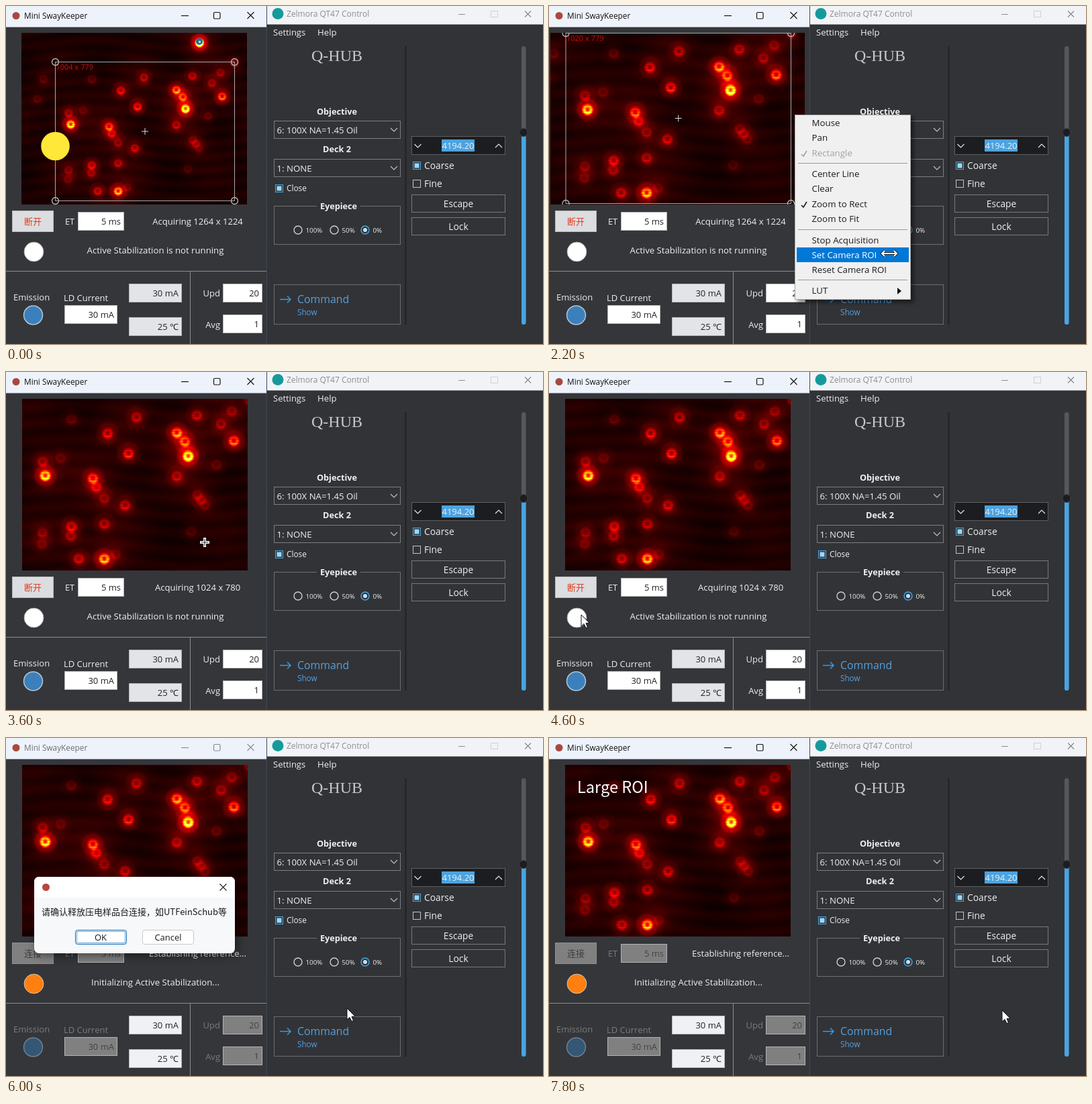
These frames come from a looping animation (800x504 px, 8000 ms). An HTML page with a canvas:

```html
<!DOCTYPE html>
<html lang="en">
<head>
<meta charset="utf-8">
<style>
  html, body { margin: 0; width: 100%; height: 100%; overflow: hidden; background: #35363a; }
  canvas { display: block; width: 800px; height: 504px; }
</style>
</head>
<body>
<canvas id="stage" width="800" height="504"></canvas>
<script>
const ctx = document.getElementById('stage').getContext('2d');
const LATIN = '"Open Sans", "Noto Sans", sans-serif';
const HAN = '"Noto Sans CJK SC", "Noto Sans CJK JP", "Noto Sans CJK", sans-serif';
const LOOP = 8000, STEP = 200;

// ---------- drawing helpers ----------
function text(str, x, yMid, { size = 13, color = '#f0f0f0', align = 'left', weight = 400, font = LATIN } = {}) {
  ctx.font = `${weight} ${size}px ${font}`;
  ctx.fillStyle = color;
  ctx.textAlign = align;
  ctx.fillText(str, x, yMid + size * 0.36);
}
function fill(x, y, w, h, color) {
  ctx.fillStyle = color;
  ctx.fillRect(x, y, w, h);
}
function frame(x, y, w, h, color, background) {
  if (background) fill(x, y, w, h, background);
  ctx.lineWidth = 1;
  ctx.strokeStyle = color;
  ctx.strokeRect(x + 0.5, y + 0.5, w - 1, h - 1);
}
function disc(x, y, r, color, border, width = 1) {
  ctx.beginPath();
  ctx.arc(x, y, r, 0, 7);
  if (color) { ctx.fillStyle = color; ctx.fill(); }
  if (border) { ctx.lineWidth = width; ctx.strokeStyle = border; ctx.stroke(); }
}
function lines(color, width, ...paths) {
  ctx.beginPath();
  for (const p of paths)
    for (let i = 0; i < p.length; i += 2) i ? ctx.lineTo(p[i], p[i + 1]) : ctx.moveTo(p[i], p[i + 1]);
  ctx.strokeStyle = color;
  ctx.lineWidth = width;
  ctx.stroke();
}
function panel(x, y, w, h, r, color, border) {
  ctx.beginPath();
  ctx.roundRect(x, y, w, h, r);
  ctx.fillStyle = color;
  ctx.fill();
  if (border) { ctx.strokeStyle = border; ctx.lineWidth = 1; ctx.stroke(); }
}
function withShadow(blur, offset, draw) {
  ctx.save();
  ctx.shadowColor = 'rgba(0,0,0,.5)';
  ctx.shadowBlur = blur;
  ctx.shadowOffsetX = ctx.shadowOffsetY = offset;
  draw();
  ctx.restore();
}
const cross = (x, y, r, color = '#ddd', width = 1) =>
  lines(color, width, [x - r, y, x + r, y], [x, y - r, x, y + r]);
const closeMark = (x, y, r, color) =>
  lines(color, 1.1, [x - r, y - r, x + r, y + r], [x - r, y + r, x + r, y - r]);

// ---------- fluorescence picture: x, y, peak ----------
const SPOTS = [
  [57, 154, .8], [53, 133, .22], [80, 128, .11], [128, 158, .46], [133, 171, .28], [145, 188, .2],
  [150, 91, .36], [181, 121, .42], [193, 67, .28], [253, 90, .54], [265, 103, .46], [270, 125, .9],
  [253, 155, .26], [283, 64, .26], [319, 77, .22], [335, 58, .18], [338, 102, .54], [312, 138, .12],
  [284, 183, .15], [289, 190, .15], [295, 198, .12], [176, 198, .3], [145, 226, .26], [96, 230, .32],
  [95, 244, .2], [53, 239, .18], [52, 256, .14], [145, 278, .68], [107, 278, .3], [162, 271, .12],
  [96, 70, .12], [361, 41, .16], [296, 2, 1.1], [6, 70, .12], [-5, 107, .1], [274, 237, .09]
];
function intensity(x, y) {
  let v = 0.036 + 0.009 * Math.sin(y / 4 + 2 * Math.sin(x / 60)) + 0.012 * Math.sin(x / 23) * Math.sin(y / 31);
  for (const [sx, sy, peak] of SPOTS) {
    const dx = x - sx, dy = y - sy, r = Math.hypot(dx, dy);
    if (r > 70) continue;
    const ring = 0.6 * Math.exp(-(((r - 5.3) / 3) ** 2)) * (0.75 + 0.25 * dy / (r + 1)) * (1 + 0.15 * Math.cos(1.5 * dy));
    const blob = 0.28 * Math.exp(-r * r / 110);
    const fringe = 0.07 * Math.exp(-(((r - 14) / 3) ** 2));
    v += peak * (ring + blob + fringe + 0.06 * Math.exp(-r * r / 900));
  }
  return v;
}
function renderPicture(w, h, mapX, mapY) {
  const canvas = document.createElement('canvas');
  canvas.width = w;
  canvas.height = h;
  const c = canvas.getContext('2d'), image = c.createImageData(w, h);
  for (let y = 0, i = 0; y < h; y++)
    for (let x = 0; x < w; x++) {
      const v = 3 * intensity(mapX(x), mapY(y));
      for (let k = 0; k < 3; k++) image.data[i++] = 255 * (v - k);
      image.data[i++] = 255;
    }
  c.putImageData(image, 0, 0);
  return canvas;
}
const ZOOM = 1.246;
const zoomedPicture = renderPicture(379, 256, x => x + 2, y => y + 40);
const fittedPicture = renderPicture(336, 256,
  x => 57 + ZOOM * (x + 23 - 96), y => 154 + ZOOM * (y + 40 - 176));

function selection(x1, y1, x2, y2, label) {
  ctx.lineWidth = 1;
  ctx.strokeStyle = '#aaa';
  ctx.strokeRect(x1, y1, x2 - x1, y2 - y1);
  text(label, x1 + 1, y1 + 7.5, { size: 11, color: '#c01010' });
  for (const x of [x1, x2]) for (const y of [y1, y2]) disc(x, y, 5, null, '#bbb', 1.3);
  cross((x1 + x2) / 2, (y1 + y2) / 2, 5);
}
function picture(t) {
  ctx.save();
  ctx.beginPath();
  ctx.rect(2, 40, 379, 256);
  ctx.clip();
  if (t < 1200) {
    ctx.drawImage(fittedPicture, 23, 40);
    disc(288, 53, 5, '#2668a8');
    fill(287, 52, 3, 3, '#e8e070');
    ctx.restore();
    const dragged = t >= 200;
    selection(dragged ? 70.5 : 73.5, 83.5, 340.5, 290.5, dragged ? '1020 x 779' : '1004 x 779');
    return;
  }
  if (t < 2400) {
    ctx.drawImage(zoomedPicture, 2, 40);
    selection(25, 40.5, 360.5, 294.5, '1020 x 779');
  } else {
    ctx.drawImage(zoomedPicture, 21, 0, 336, 256, 24, 40, 336, 256);
  }
  ctx.restore();
}

// ---------- left window ----------
function field(x, y, w, value, background, color = '#222') {
  frame(x, y, w, 28, '#b4b4b4', background);
  text(value, x + w - 5, y + 14, { color, align: 'right' });
}
function leftWindow(t) {
  const busy = t >= 5000, modal = t >= 4800 && t < 7000;
  fill(0, 0, 388, 504, '#35363a');
  fill(0, 0, 388, 31.5, '#eef3fb');
  const ink = modal ? '#8b8d91' : '#111';
  disc(15, 14.5, 5.5, '#a8493f');
  text('Mini SwayKeeper', 27, 14.5, { size: 11.8, color: modal ? '#6e7074' : '#111' });
  lines(ink, 1.2, [261, 14.5, 272, 14.5]);
  ctx.strokeStyle = ink;
  ctx.beginPath();
  ctx.roundRect(309.5, 9.5, 9.5, 9.5, 1.5);
  ctx.stroke();
  closeMark(364.5, 14, 5, ink);

  picture(t);

  const label = busy ? '#7b7c7e' : '#eeeeee';
  const dim = '#808080', value = busy ? '#424242' : '#222';
  const editable = busy ? dim : '#fff', readout = busy ? '#f0f1f4' : '#e2e4e8';
  frame(9, 305, 62, 32, busy ? '#909090' : '#b8b8b8', busy ? dim : '#dcdde0');
  text(busy ? '连接' : '断开', 40, 321, { weight: 500, color: busy ? '#3d3d3d' : '#e03a1c', align: 'center', font: HAN });
  text('ET', 88, 321.5, { color: label, size: 12.7 });
  field(107, 307, 69, '5 ms', editable, value);
  const status = busy ? 'Establishing reference...' : `Acquiring ${t < 2400 ? '1264 x 1224' : '1024 x 780'}`;
  text(status, 285.5, 321, { size: 13.1, align: 'center' });
  disc(41.5, 366.5, 14.4, busy ? '#ff8010' : '#fff', busy ? '#d8c8b8' : '#b4b4b4');
  text(busy ? 'Initializing Active Stabilization...' : 'Active Stabilization is not running', 222.5, 364.5,
    { size: 13.2, align: 'center' });

  lines('#8c8d90', 1, [0, 395.5, 388, 395.5], [274.5, 396, 274.5, 504]);
  text('Emission', 11, 434, { color: label });
  disc(40.5, 461, 14, busy ? '#345775' : '#3b80bd', busy ? '#6e7f8e' : '#b4c4d2', 1.5);
  text('LD Current', 86, 435, { color: label });
  field(87, 446, 79, '30 mA', editable, value);
  field(183, 414, 79, '30 mA', readout);
  field(183, 464, 79, '25 ℃', readout);
  text('Upd', 319, 428.5, { color: label, align: 'right' });
  field(323, 414, 59, '20', editable, value);
  text('Avg', 319, 475.5, { color: label, align: 'right' });
  field(323, 460, 59, '1', editable, value);
}

// ---------- right window ----------
function chevron(x, y, dir, color = '#e6e6e6') {
  lines(color, 1.2, [x - 5, y - 2.5 * dir, x, y + 2.5 * dir, x + 5, y - 2.5 * dir]);
}
function combo(y, value) {
  frame(399, y, 189, 27, '#7b7d81');
  text(value, 403.5, y + 14, { size: 13.2 });
  chevron(578, y + 13.5, 1, '#c0c0c0');
}
function checkbox(x, y, on) {
  frame(x, y, 12, 12, on ? '#4aa8e0' : '#c4c4c4');
  if (on) fill(x + 2.5, y + 2.5, 7, 7, '#9bd8fa');
}
function radio(x, caption, on) {
  disc(x, 334, 6, null, on ? '#48a8e2' : '#d0d0d0', 1.4);
  if (on) disc(x, 334, 3, '#b8e4ff');
  text(caption, x + 11.5, 334, { size: 9.8 });
}
function rightWindow() {
  const heading = { size: 12.7, weight: 700, align: 'center' };
  fill(388, 0, 1, 504, '#3a4a5c');
  fill(389, 0, 411, 504, '#323337');
  fill(389, 0, 411, 27.5, '#f1f3f6');
  disc(405, 11.5, 8.5, '#159a9c');
  text('Zelmora QT47 Control', 418, 12, { size: 12, color: '#8c8e91' });
  lines('#8c8e91', 1, [674, 12.5, 684, 12.5]);
  frame(722, 7, 11, 10, '#cfd1d4');
  closeMark(777.5, 12, 4.5, '#858789');
  text('Settings', 398, 39.5);
  text('Help', 464, 39.5, { size: 13.2 });
  text('Q-HUB', 493, 73, { size: 24, color: '#c8c8c8', align: 'center', font: '"Liberation Serif", serif' });

  text('Objective', 493, 157, heading);
  combo(171, '6: 100X NA=1.45 Oil');
  text('Deck 2', 493, 213.5, heading);
  combo(228, '1: NONE');
  checkbox(401, 266, true);
  text('Close', 418, 272, { size: 11.8 });
  frame(399, 298, 189, 58, '#6e7074');
  fill(463, 296, 65, 5, '#323337');
  text('Eyepiece', 495.5, 298, heading);
  radio(435, '100%');
  radio(489, '50%');
  radio(535, '0%', true);
  frame(399, 415, 189, 60, '#6a6c70');
  lines('#3f97da', 1.5, [408, 437.5, 424, 437.5], [419, 432.5, 424, 437.5, 419, 442.5]);
  text('Command', 434, 437.5, { size: 15.8, color: '#56a0dc' });
  text('Show', 434, 457, { size: 11.7, color: '#56a0dc' });

  lines('#212226', 2, [595.5, 60, 595.5, 475]);
  frame(604, 194, 140, 28, '#5d5f63', '#1b1d21');
  fill(649, 199, 49, 18, '#4ba3e0');
  text('4194.20', 673.5, 208.5, { align: 'center' });
  chevron(613.5, 208.5, 1);
  chevron(734, 208.5, -1);
  checkbox(606, 232, true);
  text('Coarse', 623, 238, { size: 13.8 });
  checkbox(606, 259, false);
  text('Fine', 623, 265, { size: 13.8 });
  frame(604, 281, 140, 27, '#77797d');
  text('Escape', 674, 295, { size: 13.7, align: 'center' });
  frame(604, 315, 140, 27, '#77797d');
  text('Lock', 674, 328.5, { size: 13.9, align: 'center' });

  panel(768, 60, 6.5, 415, 3, '#57585c');
  panel(768, 189, 6.5, 286, 3, '#46a6e2');
  disc(771, 188.5, 6, '#1b1d21', '#3c3e42');
}

// ---------- pop-ups ----------
const MENU = [
  ['Mouse', 12], ['Pan', 34.5], ['Rectangle', 57], ['Center Line', 88.5], ['Clear', 110.5],
  ['Zoom to Rect', 133], ['Zoom to Fit', 155], ['Stop Acquisition', 187], ['Set Camera ROI', 209],
  ['Reset Camera ROI', 231], ['LUT', 262.5]
];
function menu(x, y, checked, active) {
  withShadow(6, 4, () => fill(x, y, 173, 276, '#f0f0f0'));
  frame(x, y, 173, 276, '#a8a8a8');
  for (const s of [72.5, 171.5, 246.5]) lines('#9a9a9a', 1, [x + 5, y + s, x + 168, y + s]);
  for (const [name, dy] of MENU) {
    const off = name === 'Rectangle', on = name === active;
    const color = off ? '#a2a2a2' : on ? '#fff' : '#1c1c1c';
    if (on) fill(x + 3, y + dy - 11, 167, 22, '#0078d7');
    text(name, x + 25.5, y + dy, { size: 13.3, color });
    if (off || name === checked)
      lines(color, 1.6, [x + 10, y + dy + 2, x + 13, y + dy + 5, x + 18, y + dy - 3]);
  }
  ctx.fillStyle = '#111';
  ctx.beginPath();
  ctx.moveTo(x + 153, y + 258);
  ctx.lineTo(x + 159, y + 263);
  ctx.lineTo(x + 153, y + 268);
  ctx.fill();
}
function dialog() {
  withShadow(14, 3, () => panel(42, 207, 299, 114, 7, '#f7f8fa'));
  panel(42, 207, 299, 31, [7, 7, 0, 0], '#ffffff');
  disc(59.5, 222.5, 5.5, '#b8463c');
  closeMark(323.5, 222.5, 5, '#222');
  text('请确认释放压电样品台连接，如UTFeinSchub等', 53, 259, { color: '#1a1a1a', font: HAN });
  panel(103.5, 286.5, 76, 21, 3, '#fff', '#0a68b4');
  frame(105, 288, 73, 18, '#5c9fd2');
  text('OK', 141, 297, { color: '#1a1a1a', align: 'center' });
  panel(203.5, 286.5, 76, 21, 3, '#fff', '#c8c8c8');
  text('Cancel', 241.5, 297, { color: '#1a1a1a', align: 'center' });
}

// ---------- pointer ----------
const POINTERS = {
  resize(x, y) {
    const shape = [[x - 11, y, x + 11, y], [x - 7, y - 4, x - 11, y, x - 7, y + 4], [x + 7, y - 4, x + 11, y, x + 7, y + 4]];
    lines('#222', 4, ...shape);
    lines('#fff', 2, ...shape);
  },
  plus(x, y) {
    cross(x, y, 7, '#fff', 4);
    cross(x, y, 5.5, '#333', 1.2);
  },
  arrow(x, y) {
    ctx.beginPath();
    ctx.moveTo(x, y);
    for (const [dx, dy] of [[0, 17], [4, 13.5], [7, 19.5], [9.5, 18.5], [7, 12.5], [12, 12]]) ctx.lineTo(x + dx, y + dy);
    ctx.closePath();
    ctx.fillStyle = '#fff';
    ctx.fill();
    ctx.strokeStyle = '#111';
    ctx.lineWidth = 1;
    ctx.stroke();
  }
};
// time, x, y, shape from that time on
const PATH = [
  [200, 70, 209, 'resize'], [600, 217, 62, 'arrow'], [1000, 300, 190, 'arrow'], [1200, 365, 165, 'resize'],
  [1400, 365, 165, 'resize'], [2200, 507, 369, 'resize'], [2400, 507, 369, 'resize'], [2600, 342, 234, 'plus'],
  [3400, 342, 234, 'plus'], [4200, 48, 362, 'arrow'], [5000, 48, 362, 'arrow'], [5800, 508, 403, 'arrow'],
  [6000, 508, 403, 'arrow'], [6600, 141, 297, 'arrow'], [6800, 141, 297, 'arrow'], [7400, 675, 406, 'arrow']
];
function pointer(t) {
  if (t < 400) return disc(t < 200 ? 73.5 : 70.5, 209, 21.3, '#ffe838');
  const i = PATH.findLastIndex(p => p[0] <= t);
  const [t0, x0, y0, shape] = PATH[i], [t1, x1, y1] = PATH[i + 1] || [LOOP, x0, y0];
  const u = (t - t0) / (t1 - t0), e = u * u * (3 - 2 * u);
  POINTERS[shape](x0 + (x1 - x0) * e, y0 + (y1 - y0) * e);
}

function draw(t) {
  leftWindow(t);
  rightWindow();
  if (t >= 600 && t < 1200) menu(217, 61, 'Zoom to Fit', t >= 1000 ? 'Zoom to Rect' : '');
  if (t >= 1400 && t < 2400) menu(366, 162, 'Zoom to Rect', t >= 2000 ? 'Set Camera ROI' : '');
  if (t >= 4800 && t < 7000) dialog();
  if (t >= 7400) text('Large ROI', 42, 74, { size: 23.6, weight: 500, color: '#fff', font: HAN });
  pointer(t);
}
function tick() {
  const t = performance.now() % LOOP;
  draw(Math.floor(t / STEP) * STEP);
  requestAnimationFrame(tick);
}
tick();
</script>
</body>
</html>
```
